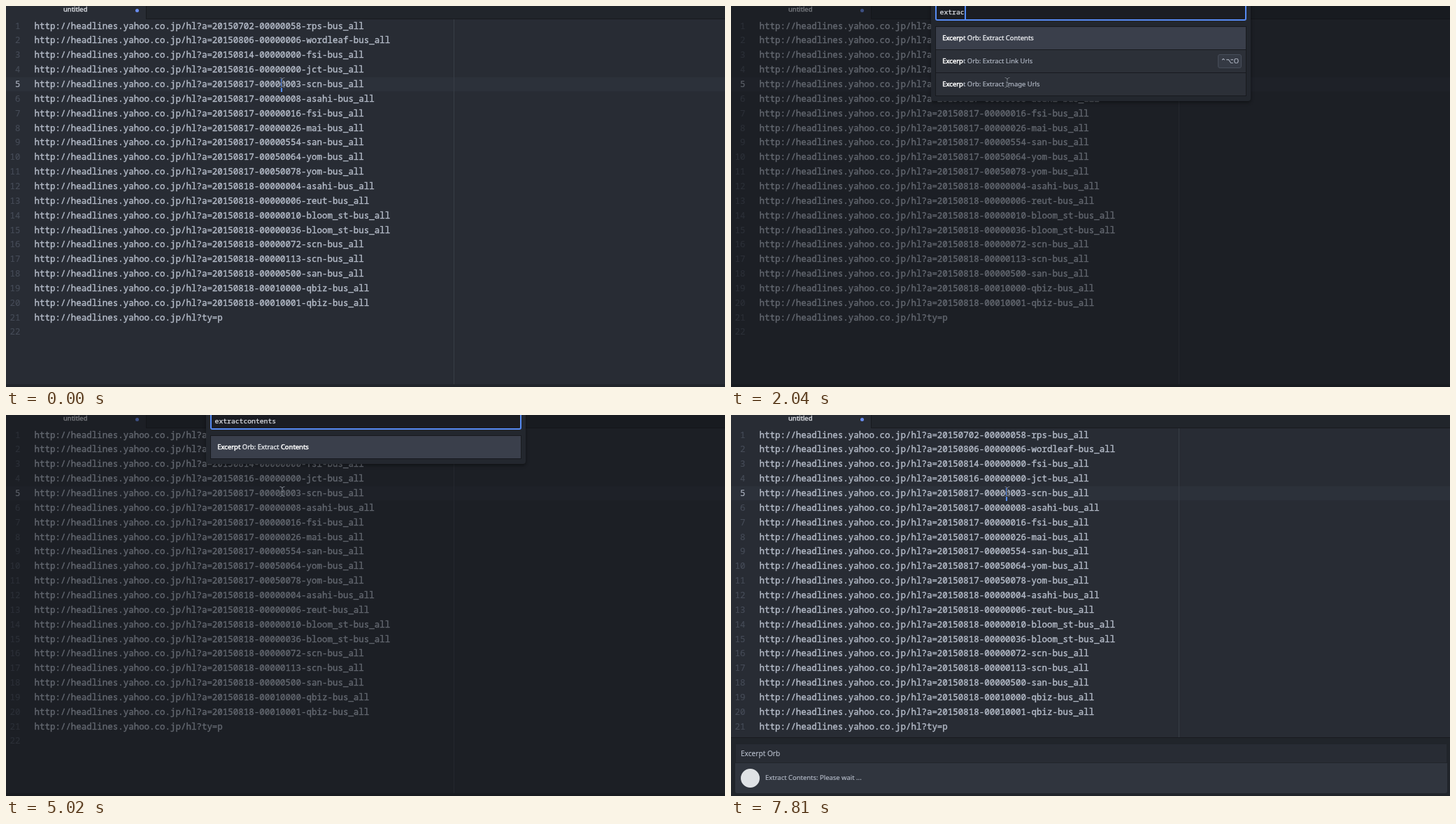
An HTML page that plays this animation: 1028x545 px, repeating every 8 s.

```html
<!DOCTYPE html>
<html lang="en">
<head>
<meta charset="utf-8">
<title>Editor command palette</title>
<style>
  html, body { margin: 0; width: 100%; height: 100%; overflow: hidden; background: #282c34; }
  #stage {
    position: relative; width: 1028px; height: 545px; overflow: hidden; background: #282c34;
    font: 9.45px "Noto Sans", "Open Sans", sans-serif; color: #b4bbc8; white-space: pre;
    -webkit-text-stroke: .15px;
  }
  #stage div, #stage svg { position: absolute; box-sizing: border-box; }
  .mono { font-family: "Noto Sans Mono", "DejaVu Sans Mono", monospace; }

  #tabs { left: 200px; top: 0; width: 828px; height: 19px; background: #21252b;
    border-left: 1px solid #181a1f; border-bottom: 1px solid #181a1f; }
  #tab { left: 82px; top: -3px; line-height: 16px; color: #dfe2e8; -webkit-text-stroke: .35px; }
  #dirty { left: 185.3px; top: 3.6px; width: 5px; height: 5px; border-radius: 50%; background: #6a8df0; }
  #active { left: 0; top: 102px; width: 1028px; height: 20px; background: #2c313a; }
  #guide { left: 640px; top: 19px; width: 1px; height: 522px; background: #383d46; }
  #foot { left: 0; top: 541px; width: 1028px; height: 4px; background: #21252b; }
  #lines { left: 0; top: 0; font-size: 12.48px; line-height: 20.85px; }
  .num { left: 0; width: 20.5px; text-align: right; color: #464c58; }
  .num.on { color: #abb2bf; }
  .url { left: 40.5px; -webkit-text-stroke: .4px; }
  #caret { left: 393px; top: 102px; width: 1.5px; height: 21px; background: #528bff; }

  #panel { left: 0; top: 461px; width: 1028px; height: 84px; background: #21252b; border-top: 1px solid #181a1f; }
  #head { left: 6px; top: 8px; width: 1018px; height: 28px; background: #282c34; border: 1px solid #21252b;
    padding-left: 7px; line-height: 26px; font-size: 10.1px; }
  #body { left: 6px; top: 36px; width: 1018px; height: 43px; background: #30353e; border-radius: 0 0 3px 3px;
    padding-left: 43px; line-height: 42px; }
  #badge { left: 8px; top: 8px; width: 27px; height: 27px; border-radius: 50%; background: #dfe2e5; }

  #modal { inset: 0; }
  #shade { inset: 0; background: rgba(16, 18, 22, .5); }
  #palette { left: 286px; top: -20px; width: 457px; background: #23272e; border-radius: 4px;
    box-shadow: 0 2px 5px rgba(0, 0, 0, .45); }
  #input { left: 6px; top: 0; width: 445px; height: 41px; background: #1b1d23;
    border: 2px solid #568af2; border-radius: 3px; }
  #query { left: 298.6px; top: 0; line-height: 18px; font-size: 9.72px; color: #dfe2e8; -webkit-text-stroke: .25px; }
  #bar { top: 0; width: 1.5px; height: 19.5px; background: #528bff; }
  #list { left: 292px; top: 29px; width: 445px; overflow: hidden; border: 1px solid #181a1f; }
  .row { left: 0; width: 443px; height: 33px; padding-left: 9.3px; line-height: 32px;
    background: #2c3038; border-bottom: 1px solid #181a1f; }
  .row.sel { background: #3a3f4b; color: #eceef2; -webkit-text-stroke: .3px; }
  .row b { font-weight: 400; color: #fff; -webkit-text-stroke: .5px; }
  .key { right: 6px; top: 6px; height: 20px; line-height: 18px; text-align: center;
    background: #353a44; border: 1px solid #474d59; border-radius: 3px;
    font-family: "Noto Sans", "DejaVu Sans", sans-serif; }
  #mouse { left: 390px; top: 101px; }
</style>
</head>
<body>
<div id="stage">
  <div id="tabs"></div><div id="tab">untitled</div><div id="dirty"></div>
  <div id="active"></div><div id="guide"></div>
  <div id="lines" class="mono"></div>
  <div id="foot"></div><div id="caret"></div>
  <div id="panel">
    <div id="head">Excerpt Orb</div>
    <div id="body"><div id="badge"></div>Extract Contents: Please wait ...</div>
  </div>
  <div id="modal">
    <div id="shade"></div>
    <div id="palette"><div id="input"></div></div>
    <div id="query" class="mono"></div><div id="bar"></div>
    <div id="list"></div>
  </div>
  <svg id="mouse" width="10" height="17" fill="none">
    <defs><path id="beam" d="M1.5 1.5Q5 1.5 5 4V13Q5 15.5 1.5 15.5M8.5 1.5Q5 1.5 5 4M5 13Q5 15.5 8.5 15.5M3.5 8.5H6.5"/></defs>
    <use href="#beam" stroke="#1b1e24" stroke-width="2"/>
    <use href="#beam" stroke="#8b919c" stroke-width=".9"/>
  </svg>
</div>
<script>
const LOOP = 8000, OPEN = 290, RUN = 5470;
const $ = id => document.getElementById(id);

const articles = `0702-00000058-rps 0806-00000006-wordleaf 0814-00000000-fsi 0816-00000000-jct
0817-00000003-scn 0817-00000008-asahi 0817-00000016-fsi 0817-00000026-mai 0817-00000554-san
0817-00050064-yom 0817-00050078-yom 0818-00000004-asahi 0818-00000006-reut 0818-00000010-bloom_st
0818-00000036-bloom_st 0818-00000072-scn 0818-00000113-scn 0818-00000500-san 0818-00010000-qbiz
0818-00010001-qbiz`.split(/\s+/).map(id => `a=2015${id}-bus_all`);

const urls = [...articles, 'ty=p'].map(q => 'http://headlines.yahoo.co.jp/hl?' + q);
$('lines').innerHTML = [...urls, ''].map((url, i) => {
  const top = `style="top:${(18.6 + 20.85 * i).toFixed(2)}px"`;
  return `<div class="num${i === 4 ? ' on' : ''}" ${top}>${i + 1}</div><div class="url" ${top}>${url}</div>`;
}).join('');

// Rows: text, shortcut, shortcut width, matched letter positions, longest query kept
const commands = [
  ['About'], ['Add Project Folder', '⇧⌘O', 36], ['Bring All Windows To Front'], ['Hide', '⌘H', 27],
  ['Hide Other Applications', '⌥⌘H', 36], ['Install Update'], ['Minimize', '⌘M', 28], ['New File', '⌘N', 27]
].map(([name, key, width]) => ['Application: ' + name, key, width, [], 0]);

const span = (from, count) => Array.from({ length: count }, (_, i) => from + i);
const word = span(0, 7);
const matches = [
  ['Excerpt Orb: Extract Contents', '', 0, [...word, ...span(21, 8)], 15],
  ['Excerpt Orb: Extract Link Urls', '⌃⌥O', 34, [...word, 18], 8],
  ['Excerpt Orb: Extract Image Urls', '', 0, [...word, 18], 8],
  ['Window: Focus Next Pane', '⌘K ⌘N', 46, [15, 16, 17], 3],
  ['Bookmarks: Jump To Next Bookmark', 'F2', 20, [20, 21, 22, 30], 4],
  ['Elasticsearch: Search Exists', '', 0, [0, 23, 26], 3],
  ['Elasticsearch: Index Document', '', 0, [0, 19, 28], 3],
  ['Elasticsearch: Helper Reindex', '', 0, [0, 28], 2]
];

const phrase = 'extractcontents';
const typed = [1300, 1450, 1600, 1750, 1890, 2040, 2340, 3230, 3380, 3530, 3680, 3830, 3970, 4120, 4570];
// The list trails the input by one step while the second word is typed
const listed = [...typed.slice(0, 8), ...typed.slice(9, 14), 4270, 4570];
const hidden = [[710, 1000], [2780, 3230], [5020, RUN]];

const count = (times, t) => times.filter(x => x <= t).length;
const show = (id, on) => { $(id).style.display = on ? '' : 'none'; };

function mark(text, spots) {
  return [...text].map((c, i) => spots.includes(i) ? `<b>${c}</b>` : c).join('').replaceAll('</b><b>', '');
}

function drawList(n) {
  const rows = (n ? matches : commands).filter(r => r[4] >= n);
  $('list').innerHTML = rows.map(([text, key, width, spots], i) =>
    `<div class="row${i ? '' : ' sel'}" style="top:${i * 33}px">${mark(text, spots.slice(0, n))}` +
    (key ? `<div class="key" style="width:${width}px">${key}</div>` : '') + '</div>').join('');
  const height = Math.min(rows.length * 33 + 1, 261);
  $('list').style.height = height + 'px';
  $('palette').style.height = height + 56 + 'px';
}

let shown = -1;
const start = performance.now();

function frame() {
  const t = (performance.now() - start) % LOOP;
  const n = count(typed, t), m = count(listed, t);
  show('modal', t >= OPEN && t < RUN);
  show('panel', t >= RUN);
  show('caret', t < OPEN || (t >= RUN && t < 5770) || t >= 7810);
  show('bar', !hidden.some(([a, b]) => t >= a && t < b));
  $('query').textContent = phrase.slice(0, n);
  $('bar').style.left = 299.3 + 5.83 * n + 'px';
  if (m !== shown) drawList(shown = m);
  requestAnimationFrame(frame);
}
frame();
</script>
</body>
</html>
```
